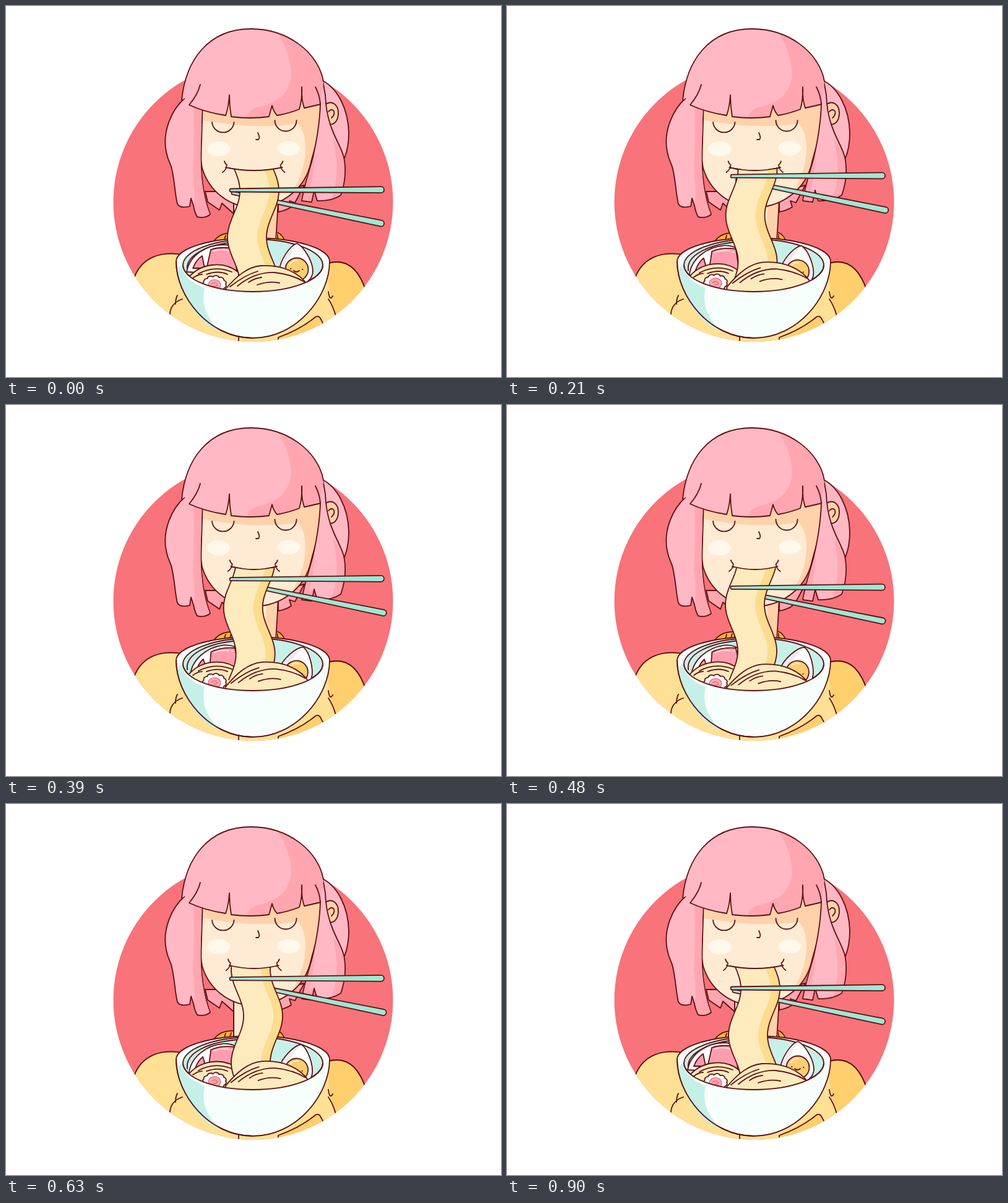
Animation, 800 px wide and 600 px high, one loop 0.93 s. Source, as an HTML page:

```html
<!DOCTYPE html>
<html lang="en">
<head>
<meta charset="utf-8">
<title>Noodles</title>
<style>
  html, body { margin: 0; width: 100%; height: 100%; overflow: hidden; background: #fff; }
  svg { display: block; width: 800px; height: 600px; }
  .ink { stroke: #5e0f12; stroke-width: 1.8; stroke-linecap: round; stroke-linejoin: round; }
  .line { fill: none; }
  .hair { fill: #ffb8c4; }
  .hair-dark { fill: #ffa6b0; }
  .skin { fill: #ffebd3; }
  .skin-dark { fill: #ffd2ab; }
  .teal { fill: #9de8d5; }
  .noodle { fill: #fdeabd; }
  .meat { fill: #ff9db0; }
</style>
</head>
<body>
<svg viewBox="0 0 800 600">
  <defs>
    <clipPath id="disc"><circle cx="399.5" cy="317" r="226"/></clipPath>
    <clipPath id="opening"><path d="M286 150H512V419A113 43 0 0 1 286 419Z"/></clipPath>
    <clipPath id="faceClip"><path id="faceShape" d="M314 160C312 190 312 235 317 262C328 300 362 326 402 326C450 324 485 292 493 252C503 215 512 190 512 145"/></clipPath>
    <clipPath id="capClip"><path id="capShape" d="M284 152C290 90 325 37 396 37C455 37 505 75 513 122L508 158L482 165L478 131L474 167Q456 174 438 177L430 161L425 179Q395 183 364 179L361 144L355 177Q322 172 296 160L289 149Z"/></clipPath>
  </defs>

  <circle cx="399.5" cy="317" r="226" fill="#f8737a"/>

  <!-- body -->
  <g clip-path="url(#disc)">
    <path class="ink" fill="#ffe094" d="M205 446C215 410 245 394 290 403L400 380L520 416C550 408 570 424 582 462L600 580H200Z"/>
    <path fill="#ffcf6e" d="M521 416C550 408 570 424 582 462L560 520L531 500Q524 470 520 440Z"/>
    <path class="ink line" d="M521 416C550 408 570 424 582 462M277 468Q274 473 274 482M285 474C272 478 264 488 265 502M528 469Q523 478 521 462M521 474Q528 484 533 501M376 530V550"/>
    <path class="ink" fill="#ffcf6e" d="M440 540V536Q476 523 500 503Q505 500 508 505L515 518L470 560Z"/>
  </g>

  <!-- hair behind the face, neck and ear -->
  <path class="ink hair-dark" d="M322 300L326 317L345 330L349 319L368 336V300ZM440 300V333Q452 331 461 325L458 315L467 318L482 290Z"/>
  <path class="ink hair" d="M512 121C535 133 553 165 554 205Q554 228 547 246L515 200Z"/>
  <path class="ink" fill="#ffb52e" d="M335 382Q345 366 368 367L400 380L438 366Q448 370 451 382Z"/>
  <path class="ink line" d="M352 381L355 371M361 379L364 370M440 378L438 369"/>
  <path class="ink skin" d="M368 312V380H437V312Z"/>
  <path class="skin-dark" d="M369 315H438V379H418L421 326Z"/>
  <path class="ink line" d="M368 318V380M440 316L436 380"/>
  <path class="ink skin-dark" d="M515 160C527 151 537 160 537 173C537 186 530 193 522 191Z"/>
  <path class="ink line" d="M521 171Q526 165 530 170Q532 176 526 181"/>

  <!-- face -->
  <g clip-path="url(#faceClip)">
    <path class="skin" d="M300 140H520V340H300Z"/>
    <path class="skin-dark" d="M300 140H520V340H435C465 300 485 270 484 225Q483 204 472 190Q400 202 300 181Z"/>
  </g>
  <use href="#faceShape" class="ink line"/>
  <g fill="#fff8ec">
    <ellipse cx="343.500" cy="231" rx="18.500" ry="12"/>
    <ellipse cx="457" cy="230" rx="18" ry="11.500"/>
  </g>
  <path class="ink line" d="M333 188A17.800 17.800 0 0 0 368.500 188M434.500 185A17.500 17.500 0 0 0 469.500 185M407 205Q411 213 408 216L404 216"/>

  <!-- side hair -->
  <path class="ink hair" d="M508 158C507 195 499 235 490 268Q482 292 478 315L494 317L498 298L503 315Q526 316 541 306Q552 275 546 245C541 222 518 200 516 144L512 121L500 131Z"/>
  <path class="hair-dark" d="M499 240Q488 272 479 314L493 316L497 298L490 301Q498 270 499 240ZM528 215Q540 230 545 246Q550 275 540 305L526 312Q542 270 528 215Z"/>
  <path class="ink hair" d="M289 149C268 167 252 203 259 236C262 252 267 256 268 264C273 285 273 305 277 320Q281 328 297 324L299 311L303 323Q305 334 309 341Q322 344 330 337C319 308 314.500 270 315.500 235L317.500 168L300 140Z"/>
  <path class="hair-dark" d="M303 160H316.500L314.500 235C314 270 318 308 329 336Q320 342 310 340L304 322Q306 300 302 267Q305 210 303 160Z"/>

  <!-- fringe and crown -->
  <use href="#capShape" class="hair"/>
  <path clip-path="url(#capClip)" class="hair-dark" d="M434 35C453 62 464 97 460 119C453 146 438 155 410 163Q389 167 389 186H530V35Z"/>
  <path class="ink line" d="M284 152C290 90 325 37 396 37C455 37 505 75 513 122M314 127Q310 143 296 160Q322 172 355 177Q360 162 361 144Q361 162 364 179Q395 183 425 179L430 161Q432 170 438 177Q456 174 474 167Q479 150 478 131Q477 150 482 165L508 159Q507 144 500 131"/>

  <path id="teeth" class="ink" fill="#fff"/>

  <!-- bowl -->
  <path class="ink" fill="#f7fffc" d="M275 413A124 38 0 0 1 523 413C523 470 470 537 399 537C328 537 275 470 275 413Z"/>
  <path fill="#c4f0e8" d="M277 425C282 473 315 517 347 526C323 505 315 480 321 456C298 447 286 435 284 419Z"/>
  <path class="ink line" d="M275 413C275 470 328 537 399 537"/>
  <ellipse class="ink" cx="399" cy="419" rx="113" ry="42" fill="#c6f0e9"/>
  <path class="ink line" d="M293 428C289 402 328 385 375 381"/>

  <g clip-path="url(#opening)">
    <g id="meat">
      <path class="ink" fill="#fff" d="M292 430C297 402 325 386 352 386Q371 387 377 399V435Z"/>
      <path class="ink meat" d="M302 424Q307 411 317 404L321 424ZM325 421L331 394Q349 388 370 393L373 430Z"/>
      <path fill="none" stroke="#ffd6dc" stroke-width="2" stroke-linecap="round" d="M336 396Q347 392 360 396M364 397L367 398"/>
    </g>
    <g id="egg">
      <path class="ink" fill="#fff" d="M1 -40C13 -35 27 -10 27 5A27 24 0 0 1 -27 3C-26 -12 -11 -36 1 -40Z"/>
      <path fill="#ecebf0" d="M0 -38C-10 -34 -25 -10 -26 4L-19 10Q-15 -16 0 -38Z"/>
      <circle class="ink" cx="1" cy="2" r="18.500" fill="#fccf72"/>
      <path fill="none" stroke="#fff0c2" stroke-width="2" stroke-linecap="round" d="M-11 -5Q-6 -13 1 -12"/>
      <path class="ink line" d="M-9 1H-8.500M10 2H10.500M-4 4Q0 8 5 4"/>
    </g>
    <g id="backMound">
      <path class="ink noodle" d="M292 443C312 415 352 411 376 431V470H292Z"/>
      <path class="ink line" d="M311 433Q337 419 365 430M324 434Q343 427 358 434M302 440Q310 434 317 434"/>
    </g>
    <g id="swirl">
      <path id="petals" class="ink" fill="#fff"/>
      <ellipse rx="10" ry="8.500" cy="1" fill="#ffa6b4" stroke="#e8606f" stroke-width="1.2"/>
      <path fill="none" stroke="#e8606f" stroke-width="1.2" stroke-linecap="round" d="M-5 0Q1 -5 5 1Q2 5 -2 3"/>
    </g>
  </g>

  <path id="lowerStick" class="ink teal"/>
  <path id="strip" class="noodle"/>
  <path id="stripShade" fill="#fcdc8d"/>
  <path id="stripEdges" class="ink line"/>

  <g clip-path="url(#opening)">
    <g id="frontMound">
      <path class="ink noodle" d="M353 460C372 437 390 422 412 420C445 418 473 430 488 452L480 475H353Z"/>
      <path class="ink line" d="M362 454Q386 435 407 429M374 453Q402 430 434 431Q462 434 482 446M392 447Q402 440 413 439M406 451Q425 444 442 448"/>
    </g>
  </g>
  <path class="ink line" d="M286 419A113 43 0 0 0 512 419"/>

  <path id="mouth" class="ink line"/>
  <path id="upperStick" class="ink teal"/>
</svg>

<script>
const LOOP = 930, STEP = 30;
const el = id => document.getElementById(id);
const set = (id, name, value) => el(id).setAttribute(name, value);

// Smooth curve through [time, value] keys, flat at every turning point
function curve(keys, t) {
  const slope = i => {
    const a = keys[i - 1], b = keys[i], c = keys[i + 1];
    if (!a || !c || (b[1] - a[1]) * (c[1] - b[1]) <= 0) return 0;
    return (c[1] - a[1]) / (c[0] - a[0]);
  };
  let i = 0;
  while (i < keys.length - 2 && t > keys[i + 1][0]) i++;
  const [t0, v0] = keys[i], [t1, v1] = keys[i + 1], d = t1 - t0;
  const u = Math.min(1, (t - t0) / d), w = u * u * (3 - 2 * u);
  return v0 + (v1 - v0) * w + d * u * (1 - u) * ((1 - u) * slope(i) - u * slope(i + 1));
}

const LIFT = [[0, 0], [285, 27.5], [525, 0], [725, 28.5], [900, 0]];
const SETTLE = [[0, 0], [120, .2], [300, .8], [460, 1], [630, .65], [780, .13], [900, 0]];
const CREST = [[0, 449], [120, 428], [300, 403], [480, 398], [630, 343], [780, 308], [900, 299]];
const SWAY = [[0, 368], [120, 366], [300, 362], [480, 363], [630, 374], [780, 368], [900, 368]];

const stick = length =>
  `M0 -2.500L${length} -5a5 5 0 0 1 0 10L0 2.500a2.500 2.500 0 0 1 0 -5Z`;
set('upperStick', 'd', stick(242));
set('lowerStick', 'd', stick(244));

let petals = '';
for (let i = 0; i <= 11; i++) {
  const a = i / 11 * 2 * Math.PI;
  const point = `${18 * Math.cos(a)} ${12 * Math.sin(a)}`;
  petals += i ? `A5.500 4.500 0 0 1 ${point}` : `M${point}`;
}
set('petals', 'd', petals + 'Z');

function drawStrip(t, top) {
  const crest = curve(CREST, t), sway = curve(SWAY, t);
  const edge = offset => {
    const points = [];
    for (let y = top; y <= 444; y += 4)
      points.push(`${(sway + offset + 10 * Math.cos((y - crest) * Math.PI / 75)).toFixed(1)} ${y}`);
    return points;
  };
  const left = edge(0), right = edge(63), shade = edge(48);
  const area = (a, b) => `M${a.join('L')}L${[...b].reverse().join('L')}Z`;
  set('strip', 'd', area(left, right));
  set('stripShade', 'd', area(shade, right));
  set('stripEdges', 'd', `M${left.join('L')}M${right.join('L')}`);
}

function drawMouth(t, settle) {
  const half = 46 - 9 * settle, l = 401 - half, r = 400.5 + half;
  const open = Math.max(0, 1 - Math.abs(t - 300) / 110);
  const lip = `M${l} 261Q401 271 ${r} 261`;
  set('teeth', 'd', open ? `${lip}Q401 ${271 + 14 * open} ${l} 261` : '');
  set('mouth', 'd', `${lip}M${l - 2} 251q1 4 4 6q-1 8 -7 12M${r + 1} 251q-1 4 -4 6q1 8 7 12`);
}

function draw(t) {
  const lift = curve(LIFT, t), rise = lift / 28, settle = curve(SETTLE, t);
  set('upperStick', 'transform', `translate(364 ${298 - lift}) rotate(-.2)`);
  set('lowerStick', 'transform', `translate(${367 + 6.5 * rise} ${302.5 - lift * .95}) rotate(11.6)`);
  set('meat', 'transform', `rotate(${-8 * settle} 370 394)`);
  set('egg', 'transform', `translate(469 ${424 + 6 * settle}) rotate(${16 * settle})`);
  set('swirl', 'transform', `translate(337 ${450 - 3 * rise})`);
  set('backMound', 'transform', `translate(0 ${-3 * settle})`);
  set('frontMound', 'transform', `translate(${3 * rise} ${-7 * rise})`);
  drawStrip(t, 264);
  drawMouth(t, settle);
}

function tick() {
  draw(Math.floor(performance.now() % LOOP / STEP) * STEP);
  requestAnimationFrame(tick);
}
tick();
</script>
</body>
</html>
```
